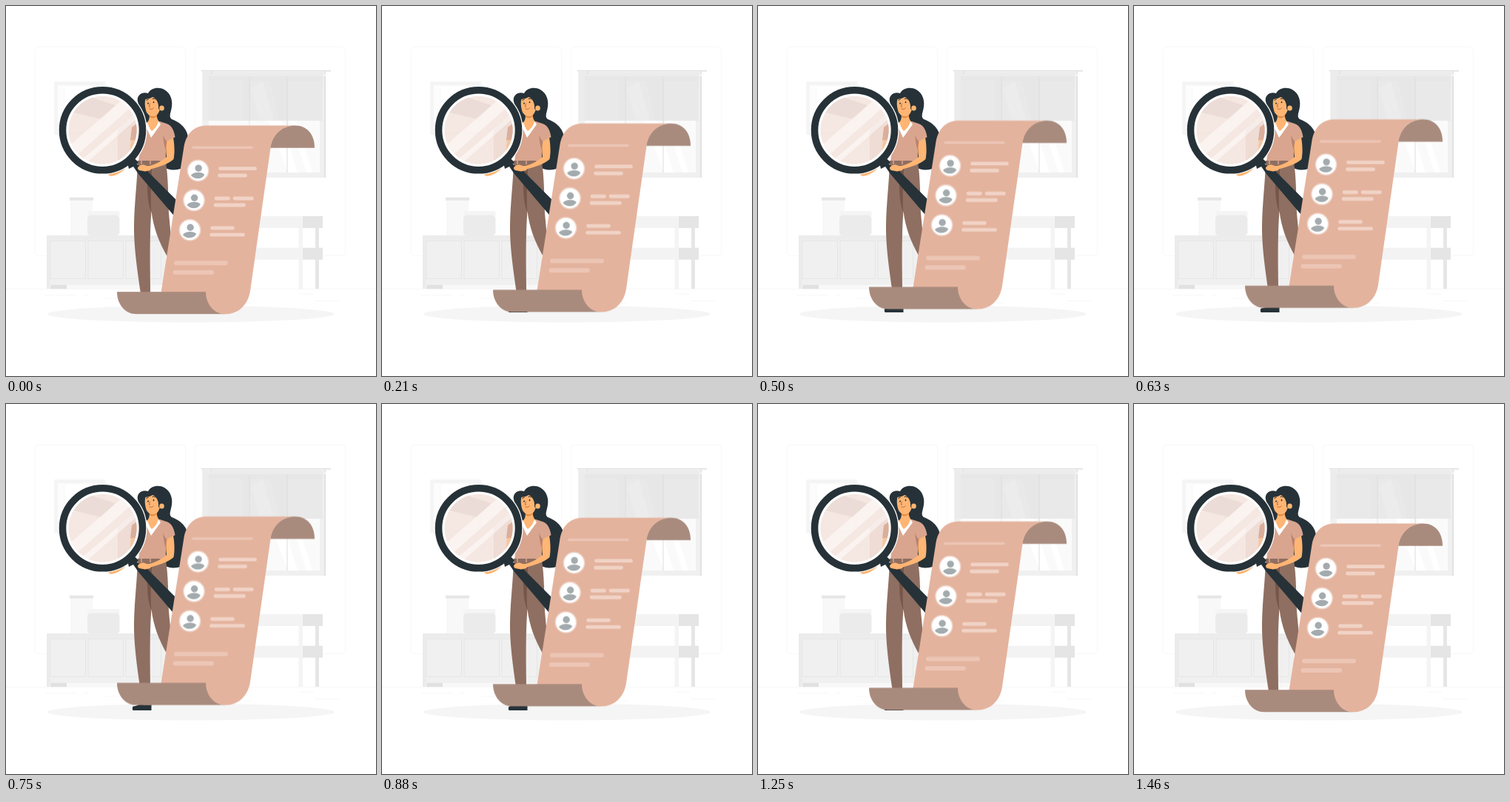
An HTML page for the animation above (1500 ms loop, 500x500 px).

```html
<!DOCTYPE html>
<html lang="en">
<head>
<meta charset="utf-8">
<title>Reviewing a list</title>
<style>
  html, body { margin: 0; width: 100%; height: 100%; overflow: hidden; background: #fff; }
  svg { display: block; width: 100vw; height: 100vh; }
  .paper { animation: float 750ms steps(18, jump-none) -4ms infinite alternate; }
  @keyframes float {
    from { transform: translateY(0); }
    to { transform: translateY(-9.44px); }
  }
  .skin { fill: #ffb573; }
  .dark { fill: #263238; }
  .shirt { fill: #d9a58f; }
  .pants { fill: #8f6f61; }
  .back { fill: #a98b7e; }
  .bar { fill: none; stroke: #f1d3c6; stroke-width: 4.8; stroke-linecap: round; }
  .faint { stroke: #ecc5b5; stroke-width: 6; }
</style>
</head>
<body>
<svg viewBox="0 0 500 500">
  <defs>
    <clipPath id="glass"><circle cx="130.5" cy="167.8" r="46"/></clipPath>
    <g id="avatar">
      <circle r="15" fill="#efd5c9"/>
      <circle r="13.4" fill="#fff"/>
      <circle cx=".6" cy="-3.4" r="4.7" fill="#a3abae"/>
      <path d="M-9.6 6.2C-6 1.4 5 .8 8.8 5.4C5.5 12-5 12.4-9.6 6.2Z" fill="#a3abae"/>
    </g>
    <g id="door">
      <rect width="47.5" height="51" fill="#f0f0f0" stroke="#e4e4e4" stroke-width=".8"/>
    </g>
  </defs>

  <!-- room -->
  <g fill="none" stroke="#ebebeb" stroke-width=".4">
    <rect x="39" y="55" width="203.6" height="282.6" rx="5"/>
    <rect x="255" y="55" width="203.6" height="282.6" rx="5"/>
    <path d="M0 382.5H500M416.8 398.5h33M322.5 401.3h8.7M396.6 389.3h19.2M52.5 391h43.2M104.6 391h6.3M131.5 395.2h93.7"/>
  </g>
  <rect x="67.5" y="104.5" width="64.5" height="67.5" fill="#fcfcfc" stroke="#f4f4f4" stroke-width="4.6"/>
  <rect x="79" y="108" width="44" height="53" fill="#fff" stroke="#f3f3f3" stroke-width=".6"/>

  <!-- window -->
  <rect x="265" y="89" width="166.5" height="143" fill="#f0f0f0"/>
  <rect x="430" y="95" width="2" height="137" fill="#e2e2e2"/>
  <path d="M274 155h54v70h-54zM330 155h49v70h-49zM381 155h43v70h-43z" fill="#fafafa"/>
  <path d="M354 155h18l22 70h-13zM384 155h8l22 70h-8z" fill="#fff"/>
  <path d="M380 155V225" stroke="#e3e3e3" stroke-width="1.2"/>
  <rect x="266" y="89" width="162" height="66" fill="#ececec"/>
  <rect x="274" y="95" width="154" height="60" fill="#e7e7e7"/>
  <path d="M274 101L320 100V155H274zM330 101H357L369 155H330zM381 101H428V155H381z" fill="#e9e9e9"/>
  <path d="M331 112L347 101L362 155H343z" fill="#ececec"/>
  <path d="M329 95V155M380 95V155" stroke="#dfdfdf" stroke-width="1.2"/>
  <path d="M264 87.7H439" stroke="#e1e1e1" stroke-width="1.8"/>
  <path d="M277.5 88v4M431.5 88v4" stroke="#e1e1e1" stroke-width="1.5"/>

  <!-- shelf -->
  <path d="M395.5 300h5.5v82h-5.5z" fill="#f4f4f4"/>
  <path d="M418 300h5v82h-5z" fill="#e6e6e6"/>
  <path d="M330 284h71v16h-71zM330 326.700h71v16h-71z" fill="#f3f3f3"/>
  <path d="M401 284h27v16h-27zM401 326.700h27v16h-27z" fill="#e5e5e5"/>

  <!-- cabinet -->
  <rect x="87" y="261" width="30" height="49" fill="#f8f8f8"/>
  <rect x="86" y="258.700" width="32" height="4" fill="#e6e6e6"/>
  <rect x="110" y="277" width="43.500" height="7" rx="1" fill="#f5f5f5"/>
  <rect x="110" y="282.500" width="43.500" height="28" rx="5" fill="#ebebeb"/>
  <rect x="55" y="310" width="161" height="67" fill="#f0f0f0"/>
  <rect x="55" y="310" width="161" height="7" fill="#ececec"/>
  <path d="M55 317h4.500v65h-4.500z" fill="#ebebeb"/>
  <path d="M60 377h22v5.300h-22z" fill="#e1e1e1"/>
  <path d="M82 377h128v5.300h-128z" fill="#f8f8f8"/>
  <use href="#door" x="60" y="317.500"/>
  <use href="#door" x="111" y="317.500"/>
  <use href="#door" x="162" y="317.500"/>

  <ellipse cx="250" cy="416.200" rx="193.900" ry="11.300" fill="#f5f5f5"/>

  <!-- woman -->
  <path class="dark" d="M178 129C176 120 185 115 192 118C196 110 207 109 214 113C223 118 226 129 223.500 139C222 146 220 150 224 153C238 158 247 169 246 181L236 220C230 222 220 222 216 219L208 160L190 158C181 149 181 139 178 129Z"/>
  <path class="dark" d="M172 408.500C177 408 179 406 183 405.500H196.500V414H171.500C170.500 412 170.500 409.500 172 408.500Z"/>
  <path class="pants" d="M178 212H216C219.500 232 219 258 220 280L226 345L217 337C207 319 199 300 196.500 277C194 308 194.500 350 195.500 407H185C180 375 172.500 330 173 296C173.500 267 177 240 178 212Z"/>
  <path d="M190 219C192 241 189 260 196.500 279C194.500 255 197 238 197 219Z" fill="#755648"/>
  <path class="skin" d="M169 179L179 181C178 194 174 207 169 216L160 214C166 202 169 190 169 179Z"/>
  <path class="shirt" d="M190 157C184 157 178 157 174 161C170 167 168 174 168 181L179 184C181 193 181 203 178 213H217C215 203 216 192 218 184L228.500 177C227 168 224 161 217 159L208 156Z"/>
  <path d="M218 184C215 181 213 177 212 174C213 183 214 190 216 195Z" fill="#b7826f"/>
  <path class="skin" d="M193 143L204 141C203 148 204 154 208 157L198 170C194 166 191 162 190.500 157.500C194 155 194.500 149 193 143Z"/>
  <path d="M194 148C198 149 201 147 203.500 144L204 149C200 152 197 152 194 150Z" fill="#e08c46"/>
  <path d="M191 156.500L189.500 164L196 178L209 160L206 156C204 163 200 167 197 169C194 166 192 161 191 156.500Z" fill="#fff"/>
  <path class="skin" d="M189 124C192 120 203 120 207 125C210 132 209 140 205 146C200 152 191 149 189 141C187.500 135 187 129 189 124Z"/>
  <path class="dark" d="M187 126C188 117 199 116 207 120C213 125 213 136 210 142L206 139C207 130 202 124 198 123C195 125 191 126 187 126Z"/>
  <ellipse class="skin" cx="210.500" cy="138" rx="3.300" ry="3.600"/>
  <g class="dark">
    <ellipse cx="192" cy="131.500" rx=".8" ry="1.200"/>
    <ellipse cx="199.500" cy="130" rx=".8" ry="1.200"/>
  </g>
  <path d="M189.500 127.500l3-1.200M197.500 125.500c2-1 3.500-.2 4.500.8" fill="none" stroke="#263238" stroke-width="1"/>
  <path d="M194.500 131.500L193.200 136H195M193.500 138.700C196 140 198 139.500 199.500 137.500" fill="none" stroke="#b9662c" stroke-width=".9"/>
  <path class="pants" d="M178 209H217V214H178Z"/>
  <path d="M183 209v5M195 209v5M209 209v5" stroke="#d9a58f" stroke-width="1.500"/>
  <path class="skin" d="M217.500 183L226 178C228 189 228 199 226.500 207C219 214 205 218 194 221L191 217C202 214 212 209 217 204C216 197 216 190 217.500 183Z"/>
  <path class="skin" d="M137 226C144 226 151 224 158 217L161 220C156 225 147 231 140 229.500Z"/>

  <!-- magnifying glass -->
  <circle cx="130.500" cy="167.800" r="53" fill="none" stroke="#fff" stroke-width="14"/>
  <g clip-path="url(#glass)">
    <rect x="80" y="118" width="101" height="100" fill="#f5e5df" fill-opacity=".92"/>
    <path d="M78 127L107 121L148 134L128 153L108 148L88 143Z" fill="#e7d6d1" opacity=".6"/>
    <path d="M151 166L177 145V210H151Z" fill="#ecd8d0" opacity=".7"/>
    <path d="M170 164L178 158V182H168Z" fill="#dbae9a"/>
    <path d="M169 181H178V202H167Z" fill="#f7c59b"/>
    <path d="M84 190L159 125L170 136L95 202ZM103 207L176 145V153L110 211Z" fill="#fff" opacity=".5"/>
  </g>
  <circle cx="130.500" cy="167.800" r="54" fill="none" stroke="#263238" stroke-width="9.600"/>
  <path class="dark" d="M164 211L173 205.500L179 211L177 214L190 222L236 268V294L179 227L172 217L166 220Z"/>
  <path class="skin" d="M179 217C182 214 186 213.500 190 216L197 217L195 222L188 223.500L180 222C177.500 220.500 177.500 218.500 179 217Z"/>

  <!-- paper -->
  <g class="paper">
    <path class="back" d="M357 191.700C360 172 374 161.500 391 161.500C407 161.500 417 174 417 191.700Z"/>
    <path d="M391 161.500H272C254 161.500 243 172 240 193L209.500 387L270 390C270 405 282 416.300 297 416.300C314 416.300 327 404 330 385L357.500 191.700C360 173 374 161.500 391 161.500Z" fill="#e4b39d"/>
    <path class="back" d="M150 386.300H270C270 403 281 416.300 297 416.300H176C161 416.300 150 403 150 386.300Z"/>
    <path class="bar faint" style="stroke-width:3.600" d="M253 191.300H332"/>
    <use href="#avatar" x="259.500" y="222.500"/>
    <use href="#avatar" x="254" y="262.600"/>
    <use href="#avatar" x="248.500" y="302.700"/>
    <path class="bar" d="M289.500 219.700H336.500M288.500 229H323.500M284 260H300.500M309 260H332.500M283 269H321.500M278.500 300H306.500M277.500 309.200H320.500"/>
    <path class="bar faint" d="M230 347.300H297M228.500 360H278"/>
  </g>
</svg>
</body>
</html>
```
